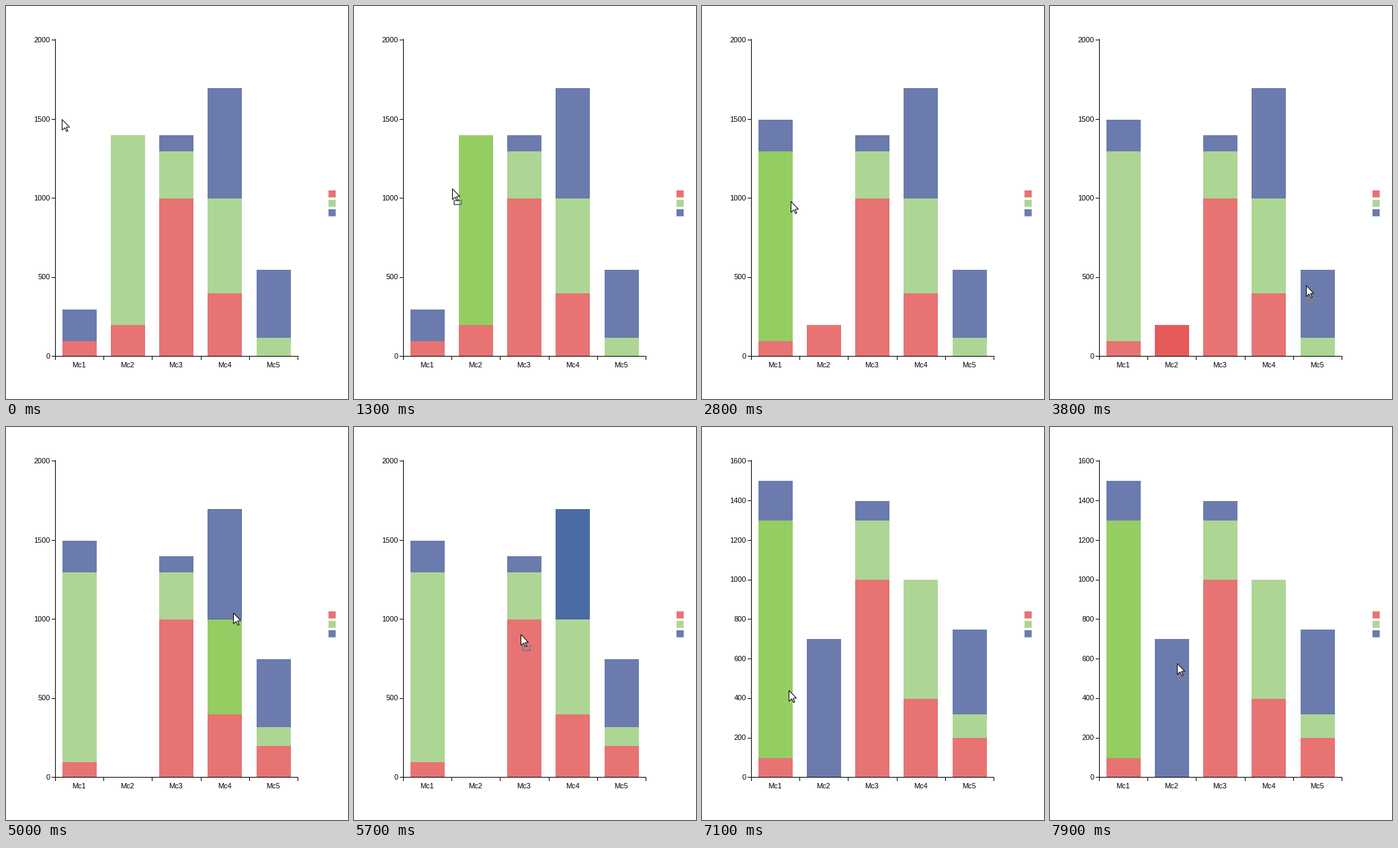
These frames come from a looping animation (509x584 px, 8000 ms). A matplotlib script:

```python
import math

import matplotlib.pyplot as plt
import numpy as np
from matplotlib.animation import FuncAnimation
from matplotlib.patches import Polygon, Rectangle

W, H, DPI = 509, 584, 100
FRAMES, STEP = 80, 100
BASE, LEFT, SPAN, PITCH, BAR_W = 520, 73, 470, 72.2, 51
PX = 72 / DPI

NORMAL = ["#E77373", "#ADD695", "#6B7BAD"]
HOT = ["#E75A5A", "#94CE63", "#4A6BA5"]
PALE = "#EFEFF7"

# Red, green and blue amount of each column
DATA = np.array([(100, 0, 200), (200, 1200, 0), (1000, 300, 100),
                 (400, 600, 700), (0, 120, 430)])
TICK_STEP = {2000: 500, 1600: 200}

# Pointer way-points (frame, x, y) and the spans in which a part is dragged
PATH = np.array([
    (4, 83, 168), (7, 155, 249), (12, 158, 270), (15, 122, 272),
    (20, 104, 271), (24, 104, 271), (28, 132, 290), (32, 179, 495),
    (34, 192, 481), (36, 340, 425), (38, 381, 415), (40, 398, 418),
    (46, 398, 418), (48, 349, 322), (50, 338, 276), (54, 321, 205),
    (59, 200, 377), (62, 166, 386), (67, 166, 386), (69, 141, 409),
    (74, 110, 365), (79, 189, 351)])
DRAGS = [(12, 22), (34, 42), (54, 64), (74, 80)]
FADE = 2

ARROW = np.array([(0, 0), (0, 16), (4, 12.5), (6.7, 18), (8.6, 17.2),
                  (6.2, 11.6), (11, 11.5)]) + 0.5


def pointer(n):
    return (np.interp(n, PATH[:, 0], PATH[:, 1]),
            np.interp(n, PATH[:, 0], PATH[:, 2]))


def bar_x(col):
    return int(84.3 + PITCH * col)


def axis_max(data):
    return 400 * math.ceil(data.sum(axis=1).max() / 400)


def edges(data, col):
    """Pixel rows between the parts of a column, from the bottom up."""
    totals = np.concatenate(([0], np.cumsum(data[col])))
    return [int(BASE + 1.6 - SPAN * t / axis_max(data)) for t in totals]


def column_at(x):
    return next((c for c in range(5) if 0 <= x - bar_x(c) < BAR_W), None)


def part_at(data, x, y):
    col = column_at(x)
    if col is not None:
        rows = edges(data, col)
        for part in range(3):
            if rows[part + 1] <= y < rows[part]:
                return col, part
    return None


def play_drops():
    """List of (frame, data, dropped part), one entry per chart state."""
    states = [(-FADE, DATA, None)]
    for start, end in DRAGS:
        if end >= FRAMES:
            break
        data = states[-1][1].copy()
        col, part = part_at(data, *pointer(start))
        goal = column_at(pointer(end)[0])
        data[goal, part] += data[col, part]
        data[col, part] = 0
        states.append((end, data, (goal, part)))
    return states


STATES = play_drops()


def state(n):
    return [s for s in STATES if s[0] <= n][-1]


def drag_start(n):
    return next((a for a, b in DRAGS if a <= n < b), None)


def active(n):
    """The part under the pointer, or the one being dragged."""
    start = drag_start(n)
    return part_at(state(n)[1], *pointer(n if start is None else start))


def colors(n, key):
    """Outline and fill of a part; the fill follows one frame later."""
    part = key[1]
    start, _, dropped = state(n)
    if key == dropped and n < start + FADE:
        return HOT[part], PALE
    now, before = active(n) == key, active(n - 1) == key
    return (HOT[part] if now or before else NORMAL[part],
            HOT[part] if before else NORMAL[part])


fig = plt.figure(figsize=(W / DPI, H / DPI), dpi=DPI, facecolor="white")
ax = fig.add_axes([0, 0, 1, 1])
ax.axis("off")


def box(x, y, w, h, color, z=1, **style):
    style = {"antialiased": False, **style}
    return ax.add_patch(Rectangle((x, y), w, h, fc=color, lw=0, zorder=z,
                                  **style))


def label(x, y, text, align):
    return ax.text(x, y, text, ha=align, va="baseline", fontsize=11 * PX,
                   family="Liberation Sans", color="black")


def scale(top):
    """Ticks and labels of one vertical scale."""
    parts = []
    for value in range(0, top + 1, TICK_STEP[top]):
        y = SPAN * value / top
        parts.append(box(68, round(BASE + 0.45 - y), 5, 1, "black"))
        parts.append(label(66, round(BASE + 4 - y), str(value), "right"))
    return parts


scales = {top: scale(top) for top in TICK_STEP}
box(LEFT, BASE - SPAN - 1, 1, SPAN + 2, "black", 3)
box(LEFT, BASE, 362, 1, "black", 3)
for i in range(6):
    box(int(LEFT + PITCH * i + 0.5), BASE, 1, 6, "black", 3)
for i in range(5):
    label(108.5 + PITCH * i, 537, f"Mc{i + 1}", "center")
for i, color in enumerate(NORMAL):
    box(480, 274 + 14 * i, 10.7, 10.5, color, antialiased=True, snap=False)

bars = {(col, part): (box(0, 0, 0, 0, "white", 1), box(0, 0, 0, 0, "white", 2))
        for col in range(5) for part in range(3)}

arrow = ax.add_patch(Polygon(ARROW, fc="white", ec="black", lw=PX, zorder=6,
                             joinstyle="miter"))

# Chequered outline shown under the pointer while dragging
rows, cols = np.indices((8, 13))
stamp = np.zeros((8, 13, 4))
stamp[..., :3] = ((rows + cols) % 2)[..., None]
stamp[..., 3] = (rows < 2) | (rows > 5) | (cols < 2) | (cols > 10)
ghost = ax.imshow(stamp, extent=(0, 13, 8, 0), interpolation="nearest",
                  aspect="auto", zorder=5)
ax.set_xlim(0, W)
ax.set_ylim(H, 0)


def draw(n):
    data = state(n)[1]
    for key, (outer, inner) in bars.items():
        col, part = key
        bottom, y = edges(data, col)[part:part + 2]
        x, h = bar_x(col), bottom - y
        edge, fill = colors(n, key)
        outer.set_bounds(x, y, BAR_W, h)
        inner.set_bounds(x + 1, y + 1, BAR_W - 2, max(h - 2, 0))
        outer.set_facecolor(edge)
        inner.set_facecolor(fill)
        outer.set_visible(h > 0)
        inner.set_visible(h > 2)

    for top, artists in scales.items():
        for artist in artists:
            artist.set_visible(top == axis_max(data))

    x, y = np.round(pointer(n))
    arrow.set_xy(ARROW + (x, y))
    ghost.set_extent((x + 2, x + 15, y + 25, y + 17))
    ghost.set_visible(drag_start(n) is not None)
    return []


anim = FuncAnimation(fig, draw, frames=FRAMES, interval=STEP, repeat=True,
                     repeat_delay=0, blit=False)
plt.show()
```
